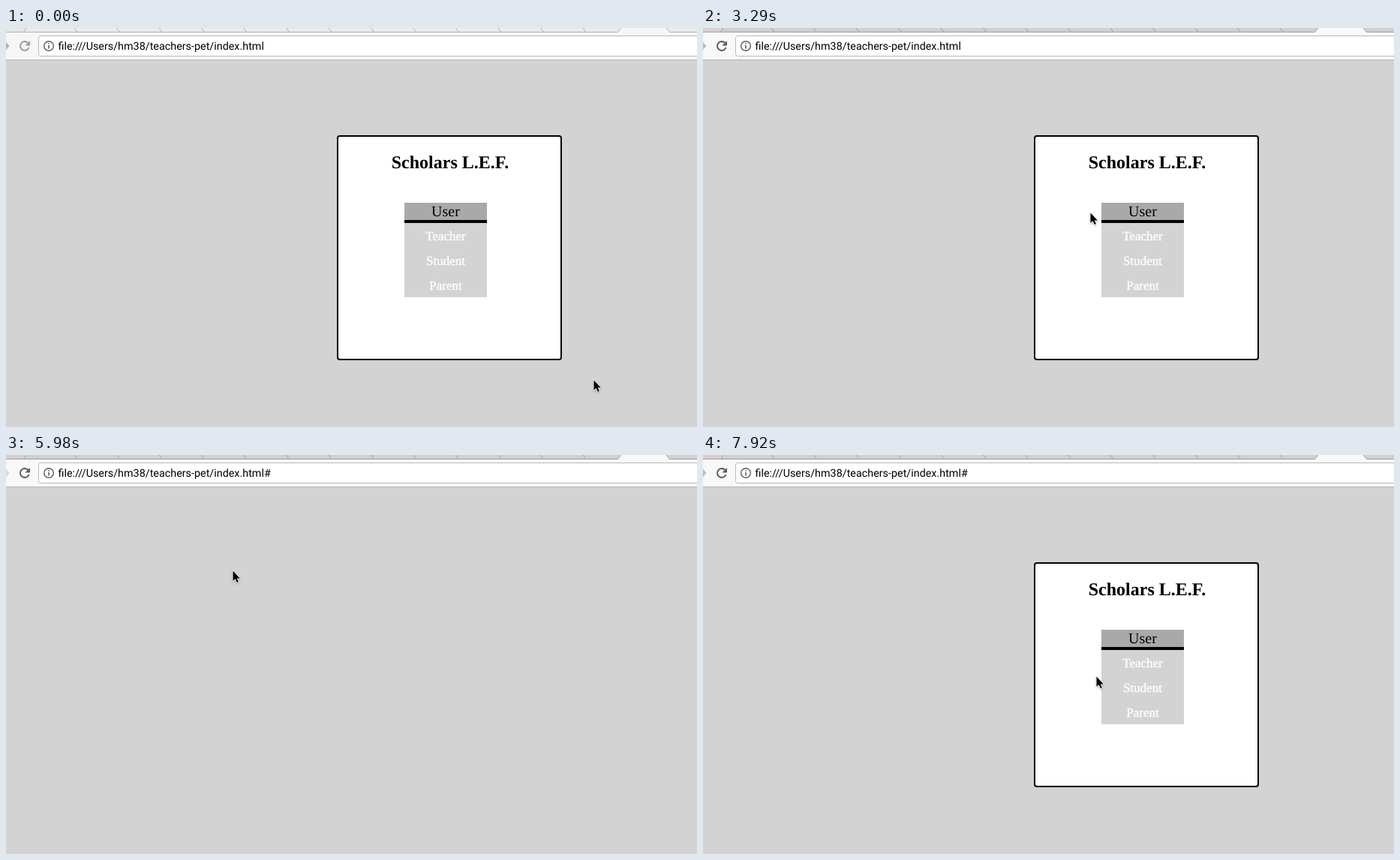
These frames come from a looping animation (921 px wide and 532 px high, 8000 ms). An HTML page:

```html
<!DOCTYPE html>
<html lang="en">
<head>
<meta charset="utf-8">
<title>Sign-in menu</title>
<style>
  html, body { margin: 0; width: 100%; height: 100%; overflow: hidden; background: #d3d3d3; }
  svg { display: block; width: 921px; height: 532px; text-rendering: geometricPrecision; }
  .off { display: none; }

  #bar { --strip: #ebebeb; --first: #e6e6e6; --edge: #b0b0b0; --tool: #f6f6f6; --icon: #9c9c9c; --fwd: #b4b4b4; }
  #bar.active { --strip: #d0d0d0; --first: #d9cfd1; --edge: #a0a0a0; --tool: #f8f8f8; --icon: #5c5c5c; --fwd: #bcbcbc; }
  #bar.visited { --fwd: #d9d9d9; }
  .strip { fill: var(--strip); }
  .first { fill: var(--first); }
  .edge { fill: none; stroke: var(--edge); }
  .tool { fill: var(--tool); }
  .icon { fill: none; stroke: var(--icon); stroke-width: 2; }
  .head { fill: var(--icon); }
  .fwd { fill: var(--fwd); }
  .url { font: 14.35px Roboto, sans-serif; }

  #card { font-family: "Liberation Serif", Times, serif; text-anchor: middle; }
  .title { font-size: 24px; font-weight: bold; }
  .user { font-size: 20px; }
  .item { font-size: 17px; fill: #fff; stroke: #fff; stroke-width: .35px; }
  .ink { stroke: #fff; stroke-width: 1.6; stroke-linejoin: round; paint-order: stroke; }
  #cursor { filter: drop-shadow(0 1px 1px rgba(0, 0, 0, .3)); }
</style>
</head>
<body>
<svg viewBox="0 0 921 532">
  <rect width="921" height="532" fill="#d3d3d3"/>

  <g id="bar">
    <rect class="strip" width="921" height="6"/>
    <path class="first" d="M0 0H27L23 6H0z"/>
    <rect class="tool" y="6" width="921" height="36"/>
    <path class="edge" id="tabs"/>
    <path class="tool" d="M815 6.5L820 0H880L885 6.5z"/>
    <path class="edge" d="M815.5 5.5L820 0M880 0L884.5 5.5"/>
    <path d="M0 42.5H921" stroke="#b5b5b5"/>
    <path class="fwd" d="M0 18.5L4.5 24L0 29.5z"/>
    <rect id="hover" x="13" y="12" width="24" height="24" rx="2"/>
    <g id="reload">
      <path class="icon" d="M30.6 26A6 6 0 1 1 29.3 19.8"/>
      <path class="head" d="M32 17V23.6H25.4z"/>
    </g>
    <path id="stop" d="M19.5 18.5L30.5 29.5M30.5 18.5L19.5 29.5" stroke="#666" stroke-width="1.8"/>
    <rect x="43.5" y="10.5" width="900" height="27" rx="3" fill="#fff" stroke="#b8b8b8"/>
    <circle cx="57" cy="24" r="6.3" fill="none" stroke="#5a5a5a" stroke-width="1.4"/>
    <path d="M57 20.2V21.8M57 23V27.6" stroke="#5a5a5a" stroke-width="1.6"/>
    <text class="url" x="69.5" y="29">file:///Users/hm38/teachers-pet/index.html<tspan id="hash">#</tspan></text>
  </g>

  <g id="card">
    <rect x="442" y="144" width="298" height="298" rx="3" fill="#fff" stroke="#000" stroke-width="2"/>
    <text class="title" x="592" y="187">Scholars L.E.F.</text>
    <rect x="531" y="233" width="110" height="23" fill="#a9a9a9"/>
    <rect x="531" y="256" width="110" height="4"/>
    <rect x="531" y="260" width="110" height="99" fill="#d3d3d3"/>
    <rect id="lit" x="531" y="260" width="110" height="33" fill="#a1d8e6"/>
    <text class="user" x="586" y="251">User</text>
    <text class="item" x="586" y="283">Teacher</text>
    <text class="item" x="586" y="316">Student</text>
    <text class="item" x="586" y="349">Parent</text>
  </g>

  <g id="cursor">
    <path id="arrow" class="ink" d="M0 0V13.6L3.1 10.8L5.3 15.6L7.4 14.7L5.3 10H9.4z"/>
    <g id="hand" fill="#fff" stroke="#000" stroke-linejoin="round" stroke-linecap="round">
      <path d="M1.2 9.6L-.4 1.6Q-.4 -.4 1 -.3Q2 -.2 2.3 1L3.2 5Q4.8 3.8 5.8 5.3Q7.4 4.6 8.1 6.1Q9.8 5.8 10 7.5V10.4L8.6 13.2V15.7H2.4V13.8L-1.4 9.7Q-2.9 7.9 -1.6 7.4Q-.7 7.1 1.2 9.6z"/>
      <path d="M3.6 10V13M5.4 10V13M7.2 10V13" stroke-width=".8"/>
    </g>
  </g>
</svg>
<script>
  const LOOP = 8000, STEP = 148;
  const FOCUS = 2390, CLICK = 4940, LOADING = 7020, LOADED = 7170;
  const START = [783, 469];
  // start time, number of steps, end x, end y
  const moves = [
    [150, 3, 620, 304],
    [1040, 1, 606, 282],
    [1190, 4, 429, 194],
    [2840, 7, 573, 280],
    [CLICK, 1, 574, 277],
    [5390, 8, 29, 30],
    [6580, 1, 25, 25],
    [LOADING, 1, 27, 25],
    [LOADED, 6, 524, 295]
  ];

  const $ = id => document.getElementById(id);
  const show = (id, on) => $(id).classList.toggle('off', !on);
  const ease = u => u * u * (3 - 2 * u);
  const inside = (x, y, left, top, w, h) => x >= left && x < left + w && y >= top && y < top + h;

  let tabs = 'M0 5.5H921M23.5 5.5L27 0';
  for (let i = 0; i < 13; i++) tabs += `M${91 + 56.5 * i} 0l4 5.5`;
  $('tabs').setAttribute('d', tabs);

  function pointer(t) {
    let [x, y] = START;
    for (const [start, steps, toX, toY] of moves) {
      if (t < start) break;
      const done = Math.min(steps, Math.floor((t - start) / STEP) + 1);
      const p = ease(done / steps);
      x += (toX - x) * p;
      y += (toY - y) * p;
    }
    return [Math.round(x), Math.round(y)];
  }

  function draw(t) {
    const [x, y] = pointer(t);
    const active = t >= FOCUS;
    const card = t < CLICK || t >= LOADED;
    const loading = t >= LOADING && t < LOADED;
    const lit = active && card && inside(x, y, 531, 260, 110, 33);

    $('bar').classList.toggle('active', active);
    $('bar').classList.toggle('visited', t >= CLICK && t < LOADED + 600);
    show('hash', t >= CLICK);
    show('card', card);
    show('lit', lit);
    show('hand', lit);
    show('arrow', !lit);
    show('stop', loading);
    show('reload', !loading);
    show('hover', inside(x, y, 13, 12, 24, 24));
    $('hover').setAttribute('fill', loading ? '#d9d9d9' : '#e4e4e4');
    $('cursor').setAttribute('transform', `translate(${x + .5} ${y + .5})`);
  }

  function tick() {
    draw(performance.now() % LOOP);
    requestAnimationFrame(tick);
  }
  tick();
</script>
</body>
</html>
```
